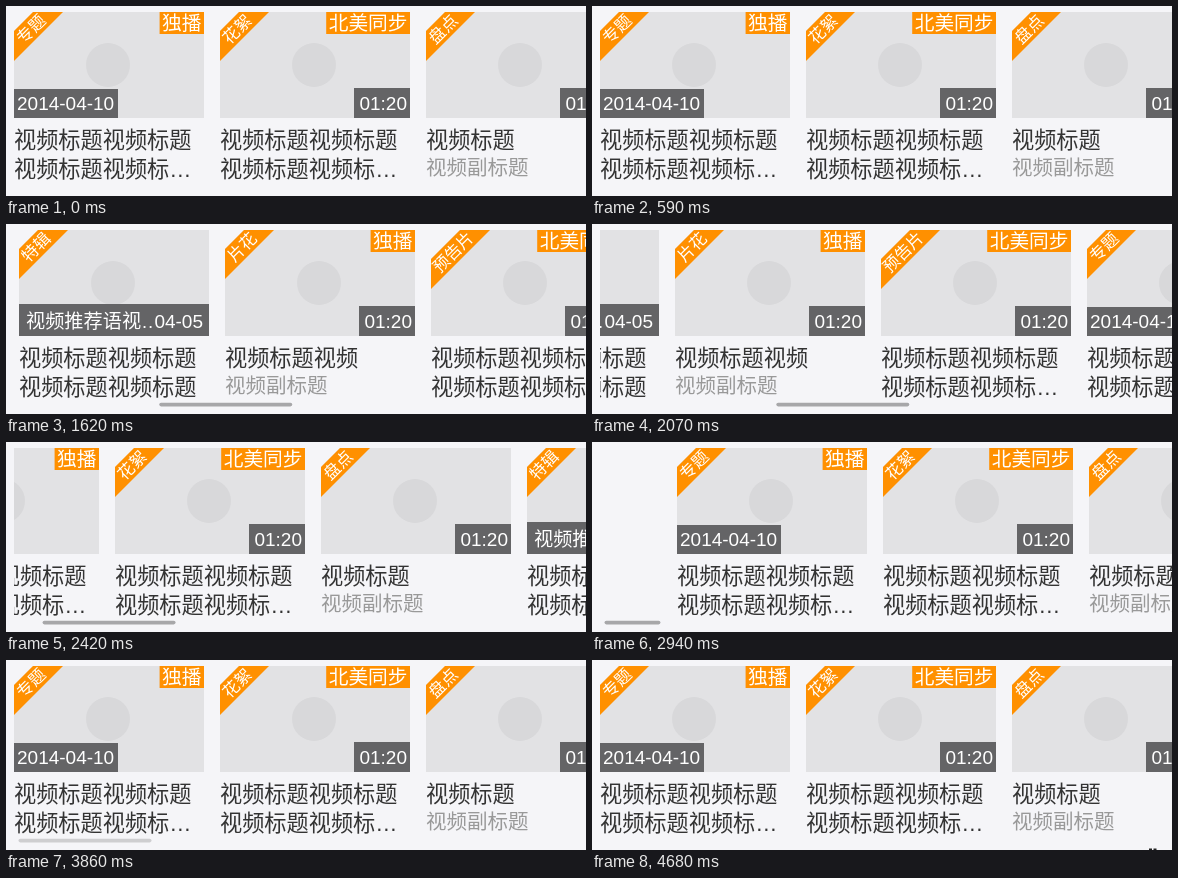
An HTML page with a canvas for the animation above (4730 ms loop, 580 by 190 pixels).

```html
<!DOCTYPE html>
<html lang="zh">
<head>
<meta charset="utf-8">
<title>视频横滑列表</title>
<style>
html, body { margin: 0; width: 100%; height: 100%; overflow: hidden; background: #f5f5f8; }
canvas { display: block; width: 580px; height: 190px; }
</style>
</head>
<body>
<canvas id="stage"></canvas>
<script>
const W = 580, H = 190, LOOP = 4730;
const LEFT = 8, TOP = 6, CARD_W = 190, CARD_H = 106, PITCH = 206;
const BG = '#f5f5f8', ORANGE = '#ff9000', SHADE = '#646466';
const FONT = '"Liberation Sans", "Noto Sans CJK SC", "Noto Sans CJK", sans-serif';

const canvas = document.getElementById('stage');
const ctx = canvas.getContext('2d');
const dpr = window.devicePixelRatio || 1;
canvas.width = W * dpr;
canvas.height = H * dpr;

const LONG = '视频标题视频标题', CUT = '视频标题视频标…';
const cards = [
  { ribbon: '专题', badge: '独播', date: '2014-04-10', title: LONG, second: CUT },
  { ribbon: '花絮', badge: '北美同步', time: '01:20', title: LONG, second: CUT },
  { ribbon: '盘点', time: '01:20', title: '视频标题', sub: '视频副标题' },
  { ribbon: '特辑', promo: '视频推荐语视…', day: '04-05', title: LONG, second: LONG },
  { ribbon: '片花', badge: '独播', time: '01:20', title: '视频标题视频', sub: '视频副标题' },
  { ribbon: '预告片', badge: '北美同步', time: '01:20', title: LONG, second: CUT }
];

// The screen refreshes in steps, ten to a group.
const groups = [1000, 1560, 2130, 2710, 3290, 3860];
function refreshTime(t) {
  let g = 0;
  while (g < groups.length - 1 && groups[g + 1] <= t) g++;
  const step = g ? 57.5 : 55.6;
  return groups[g] + Math.min(9, Math.floor((t - groups[g] + 5) / step)) * step;
}

// Swipe, glide, swipe back, glide past the edge, spring home.
function scrollAt(time) {
  if (time < 1000 || time >= 3805) return 0;
  const t = refreshTime(time);
  if (t < 1111) return 184 * Math.pow((t - 965) / 146, 1.1);
  if (t < 2070) return 184 + 674 * (1 - Math.exp((1111 - t) / 500));
  if (t < 2190) return 759 - 172 * Math.pow((t - 2070) / 120, 2);
  if (t < 2486) return 104 + 832 * (Math.exp((2418 - t) / 500) - 1);
  if (t < 3405) {
    const s = (t - 2486) / 1000;
    return -1478 * s * Math.exp(-4.767 * s);
  }
  return -17 * Math.pow(Math.max(0, 3810 - t) / 405, 1.5);
}

function rect(x, y, w, h, color) {
  ctx.fillStyle = color;
  ctx.fillRect(x, y, w, h);
}

function text(str, x, y, size, color, align = 'left') {
  ctx.font = size + 'px ' + FONT;
  ctx.fillStyle = color;
  ctx.textAlign = align;
  ctx.fillText(str, x, y);
}

function polygon(points, color) {
  ctx.beginPath();
  points.forEach(([x, y]) => ctx.lineTo(x, y));
  ctx.fillStyle = color;
  ctx.fill();
}

function drawRibbon(label) {
  const outer = label.length > 2 ? 59 : 49, inner = outer - 30;
  polygon([[0, 0], [inner, 0], [0, inner]], BG);
  polygon([[inner, 0], [outer, 0], [0, outer], [0, inner]], ORANGE);
  ctx.save();
  ctx.translate((outer + inner) / 4, (outer + inner) / 4);
  ctx.rotate(-Math.PI / 4);
  text(label, 0, 6, 16.5, '#fff', 'center');
  ctx.restore();
}

function drawCard(card, x) {
  ctx.save();
  ctx.translate(x, TOP);
  rect(0, 0, CARD_W, CARD_H, '#e2e2e4');
  ctx.beginPath();
  ctx.arc(94, 53, 22, 0, Math.PI * 2);
  ctx.fillStyle = '#d8d8da';
  ctx.fill();

  drawRibbon(card.ribbon);
  if (card.badge) {
    const w = card.badge.length * 19.7 + 5;
    rect(CARD_W - w, 0, w, 22, ORANGE);
    text(card.badge, CARD_W - w / 2, 18, 19.7, '#fff', 'center');
  }
  if (card.date) {
    rect(0, 77, 104, 29, SHADE);
    text(card.date, 3, 98, 19, '#fff');
  }
  if (card.time) {
    rect(134, 76, 56, 30, SHADE);
    text(card.time, 187, 98, 19, '#fff', 'right');
  }
  if (card.promo) {
    rect(0, 74, CARD_W, 32, SHADE);
    ctx.save();
    ctx.beginPath();
    ctx.rect(0, 74, 135, 32);
    ctx.clip();
    text(card.promo, 7, 98, 19.2, '#fff');
    ctx.restore();
    text(card.day, 184, 98, 19, '#fff', 'right');
  }

  text(card.title, 0, 136, 22.2, '#333');
  if (card.second) text(card.second, 0, 165, 22.2, '#333');
  if (card.sub) text(card.sub, 0, 163, 20.5, '#999');
  ctx.restore();
}

function drawBar(scroll, t) {
  if (t < 1000 || t >= 3920) return;
  const w = 133 + Math.min(0, scroll);
  ctx.globalAlpha = t < 3860 ? 1 : 0.5;
  ctx.beginPath();
  ctx.roundRect(12.5 + Math.max(0, scroll) * 0.2295, 178.8, w, 3.6, 1.8);
  ctx.fillStyle = '#a7a7a9';
  ctx.fill();
  ctx.globalAlpha = 1;
}

function draw(t) {
  const scroll = scrollAt(t);
  ctx.setTransform(dpr, 0, 0, dpr, 0, 0);
  rect(0, 0, W, H, BG);

  ctx.save();
  ctx.beginPath();
  ctx.rect(LEFT, 0, W - LEFT, H);
  ctx.clip();
  const first = Math.max(0, Math.floor(scroll / PITCH));
  for (let i = first; i < first + 4; i++) {
    drawCard(cards[i % cards.length], Math.round(LEFT + i * PITCH - scroll));
  }
  ctx.restore();
  drawBar(scroll, t);

  // Tip of the pointer coming in from below.
  if (t >= 4680) {
    rect(557, 188.5, 3, 1.5, '#222');
    rect(561.5, 188.5, 3, 1.5, '#222');
  }
}

const start = performance.now();
function tick() {
  draw((performance.now() - start) % LOOP);
  requestAnimationFrame(tick);
}
tick();
</script>
</body>
</html>
```
